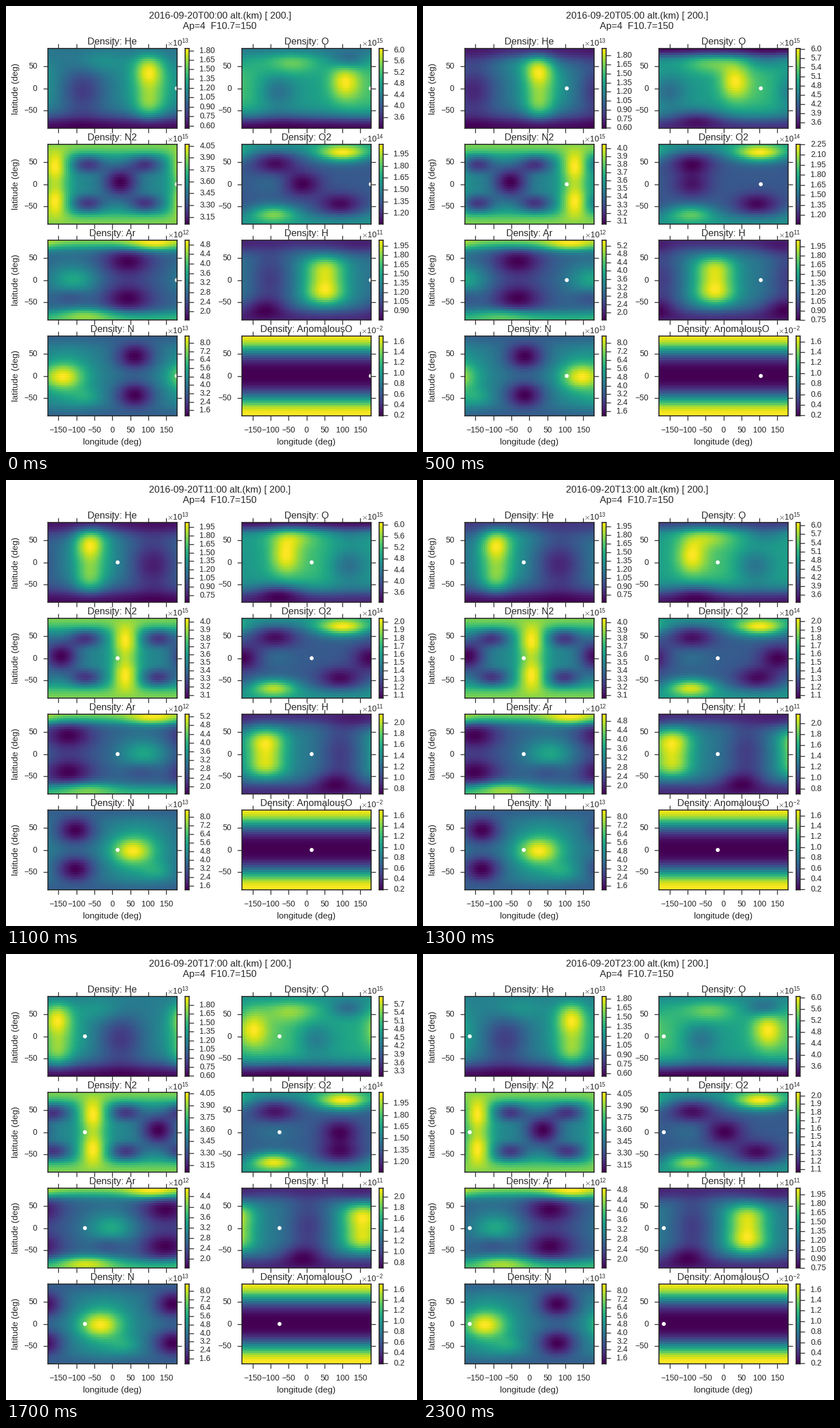
A matplotlib script for the animation above (2400 ms loop, 716x777 px).

```python
import numpy as np
import matplotlib.pyplot as plt
from matplotlib.animation import FuncAnimation

W, H, DPI = 716, 777, 100
INK = "0.15"
HOURS = 24
STEPS = [1, 1.5, 2, 2.5, 3, 4, 5, 6, 8, 10]

# An 800 px square page with two columns and four rows, trimmed to the stage.
PAGE, TRIM_X, TRIM_Y, GAP = 800, 27.35, 5.815, 0.2
CELL_W = PAGE * 0.775 / (2 + GAP)
CELL_H = PAGE * 0.8 / (4 + 3 * GAP)
MAP_W, BAR_X, BAR_W = 0.8 * CELL_W, 0.85 * CELL_W, CELL_H / 20

plt.rcParams.update({
    "font.family": "Liberation Sans", "mathtext.fontset": "cm",
    "text.color": INK, "axes.labelcolor": INK, "axes.edgecolor": INK,
    "axes.linewidth": 1.25, "axes.labelsize": 11, "axes.labelpad": 5,
    "xtick.color": INK, "ytick.color": INK,
    "xtick.labelsize": 10, "ytick.labelsize": 10,
})

LON, LAT = np.meshgrid(np.arange(-180, 180, 5) + 2.5, np.arange(-90, 90, 5) + 2.5)
C = np.cos(np.radians(LAT))
S2 = np.sin(np.radians(2 * LAT))


def glow(angle, centre, width):
    d = (angle - centre + 180) % 360 - 180
    return np.exp(-(d / width)**2 / 2)


def geo(centre, width):
    return glow(LON, centre, width)


def near(lat, width):
    return np.exp(-((LAT - lat) / width)**2 / 2)


def north(width):
    return near(90, width)


def south(width):
    return near(-90, width)


def tide(h, peak, cycles=1):
    return np.cos(np.radians(15 * cycles * (h - peak)))


def sun_lon(h):
    return 178.4 - 15 * h


# Relative density of each species; sun(angle, width) follows the subsolar point.

def helium(h, sun):
    return (sun(-78, 30) * (.36 * C + .2 * S2**2 + .1 * S2)
            + .2 * sun(-60, 60) * C**2 - .3 * sun(97, 46) * near(-6, 40)
            + .14 * geo(-35, 50) * near(60, 18)
            - north(22) * (.16 + .24 * tide(h, 8))
            - south(22) * (.42 - .08 * tide(h, 9)))


def oxygen(h, sun):
    return (.4 * sun(-74, 30) * near(14, 30) + .15 * sun(-10, 60) * C
            - .22 * sun(100, 36) * near(-8, 26)
            + .24 * geo(-40, 48) * near(56, 17)
            - geo(115, 36) * near(62, 14) * (.2 + .14 * tide(h, 21))
            - north(14) * .33 * (1 + tide(h, 8))
            - south(21) * (.55 - .15 * tide(h, 7))
            - geo(-75, 48) * near(-67, 15) * .15 * (1 + tide(h, 9)))


def nitrogen2(h, sun):
    return (sun(22, 28) * (.42 * C + .2 * S2**2)
            - .45 * sun(-157, 35) * near(4, 24)
            - .32 * S2**4 * (sun(112, 32) + sun(-88, 32))
            + .33 * (north(21) + south(21)))


def oxygen2(h, sun):
    return (.62 * geo(100, 52) * near(69, 14)
            + geo(-92, 46) * near(-66, 14) * (.5 + .12 * tide(h, 16))
            - .3 * sun(168, 38) * near(0, 20)
            - .28 * (geo(-88, 42) * near(46, 18) + geo(92, 42) * near(-46, 18))
            + .08 * geo(-90, 40) * near(5, 20)
            + .22 * (north(18) + south(18)))


def argon(h, sun):
    return (.16 * sun(75, 42) * near(0, 19) + .14 * sun(65, 60) * C**2
            - sun(-138, 48) * (.12 * C + .2 * S2**2)
            - .12 * sun(65, 32) * near(-38, 14)
            + .5 * north(15) + .28 * geo(112, 52) * near(78, 11)
            + .34 * south(14)
            + geo(-75, 58) * near(-77, 12) * (.27 + .1 * tide(h, 18)))


def hydrogen(h, sun):
    plateau = np.exp(-(LAT / 50)**4)
    return (sun(-128, 41) * (.5 * plateau + .06 * S2**2 + .05 * S2 * tide(h, 14))
            - .2 * sun(80, 42) * C - .19 * sun(60, 48) * near(-62, 16)
            - .25 * (north(19) + south(18)) - .08 * geo(145, 45) * near(70, 14))


def nitrogen(h, sun):
    return (.4 * sun(38, 40) * near(-2, 20) + .28 * sun(55, 55) * near(-5, 42)
            + .14 * sun(110, 30) * near(-48, 14)
            - .36 * sun(-117, 37) * S2**2 - .1 * sun(-117, 37) * C
            - .1 * (north(15) + south(13)))


def anomalous(h, sun):
    return np.abs(np.sin(np.radians(LAT - 2.5)))**3


# Name, power of ten, density rule, and the lowest and highest value by hour.
SPECIES = [
    ("He", 13, helium, lambda h: .59 + .035 * tide(h, 11),
     lambda h: 1.93 + .1 * tide(h, 11.5)),
    ("O", 15, oxygen, lambda h: 3.255 + .07 * tide(h, 7) + .09 * tide(h, 5.5, 3),
     lambda h: 6.024 + .03 * tide(h, 9) + .0625 * tide(h, 1, 2)),
    ("N2", 15, nitrogen2, lambda h: 3.06, lambda h: 4.057 + .016 * tide(h, 21)),
    ("O2", 14, oxygen2, lambda h: 1.063,
     lambda h: 2.108 + .08 * tide(h, 5) + .065 * tide(h, 5, 2)),
    ("Ar", 12, argon, lambda h: 1.645, lambda h: 5.09 + .43 * tide(h, 7)),
    ("H", 11, hydrogen, lambda h: .727 + .028 * tide(h, 2),
     lambda h: 2.105 + .07 * tide(h, 14)),
    ("N", 13, nitrogen, lambda h: 1.135 + .1 * tide(h, 9.5), lambda h: 8.65),
    ("AnomalousO", -2, anomalous, lambda h: .192, lambda h: 1.703),
]


def nice_ticks(lo, hi, bins=10):
    raw = (hi - lo) / bins
    scale = 10 ** np.floor(np.log10(raw))
    for s in STEPS:
        step = s * scale
        if step >= raw and np.floor(lo / step) * step + step * bins >= hi:
            break
    ticks = np.arange(np.ceil(lo / step), np.floor(hi / step) + 1) * step
    digits = 2 if round(step * 100) % 10 else 1
    return ticks, [f"{t:.{digits}f}" for t in ticks]


fig = plt.figure(figsize=(W / DPI, H / DPI), dpi=DPI, facecolor="white")


def box(x, y, w, h):
    return fig.add_axes([x / W, 1 - (y + h) / H, w / W, h / H])


def label(x, y, text, size, **kw):
    return fig.text(x / W, 1 - y / H, text, fontsize=size, **kw)


class Panel:
    def __init__(self, row, col, name, power, density, low, high):
        self.density, self.low, self.high = density, low, high
        x = PAGE * 0.125 - TRIM_X + col * CELL_W * (1 + GAP)
        y = PAGE * 0.1 - TRIM_Y + row * CELL_H * (1 + GAP)

        ax = box(x, y, MAP_W, CELL_H)
        self.image = ax.imshow(np.zeros(LON.shape), cmap="viridis", vmin=0, vmax=1,
                               origin="lower", extent=(-180, 180, -90, 90),
                               aspect="auto", interpolation="nearest")
        self.dot, = ax.plot([0], [1], "o", color="white", ms=5, mew=0)
        ax.set(xlim=(-180, 180), ylim=(-90, 90), xticks=range(-150, 151, 50))
        ax.set_yticks([-50, 0, 50])
        ax.tick_params(length=6, width=1, pad=7, top=True, right=True,
                       labelbottom=row == 3)
        plt.setp(ax.get_yticklabels(), va="center")
        if col == 0:
            ax.set_ylabel("latitude (deg)")
        if row == 3:
            ax.set_xlabel("longitude (deg)")

        self.bar = box(x + BAR_X, y, BAR_W, CELL_H)
        self.bar.imshow(np.linspace(0, 1, 256)[:, None], cmap="viridis",
                        origin="lower", extent=(0, 1, 0, 1), aspect="auto")
        self.bar.set_xticks([])
        self.bar.yaxis.tick_right()
        self.bar.tick_params(length=6, width=1, pad=7)

        label(x + MAP_W / 2, y - 7, f"Density: {name}", 12, ha="center")
        label(x + BAR_X + BAR_W, y - 4.2,
              rf"$\times\mathregular{{10^{{{power}}}}}$", 10, ha="right")

    def show(self, h):
        z = self.density(h, lambda c, w: glow(LON - sun_lon(h), c, w))
        self.image.set_data((z - z.min()) / (z.max() - z.min()))
        self.dot.set_xdata([sun_lon(h)])
        lo, hi = self.low(h), self.high(h)
        ticks, names = nice_ticks(lo, hi)
        self.bar.set_yticks((ticks - lo) / (hi - lo), names, va="center")
        self.bar.set_ylim(0, 1)


panels = [Panel(*divmod(i, 2), *s) for i, s in enumerate(SPECIES)]
heading = label(PAGE / 2 - TRIM_X, PAGE * 0.02 - TRIM_Y, "", 12, ha="center", va="top")


def update(h):
    heading.set_text(f"2016-09-20T{h:02d}:00 alt.(km) [ 200.]\nAp=4  F10.7=150")
    for panel in panels:
        panel.show(h)
    return []


anim = FuncAnimation(fig, update, frames=HOURS, interval=100, repeat=True,
                     repeat_delay=0, init_func=lambda: update(0))
plt.show()
```
